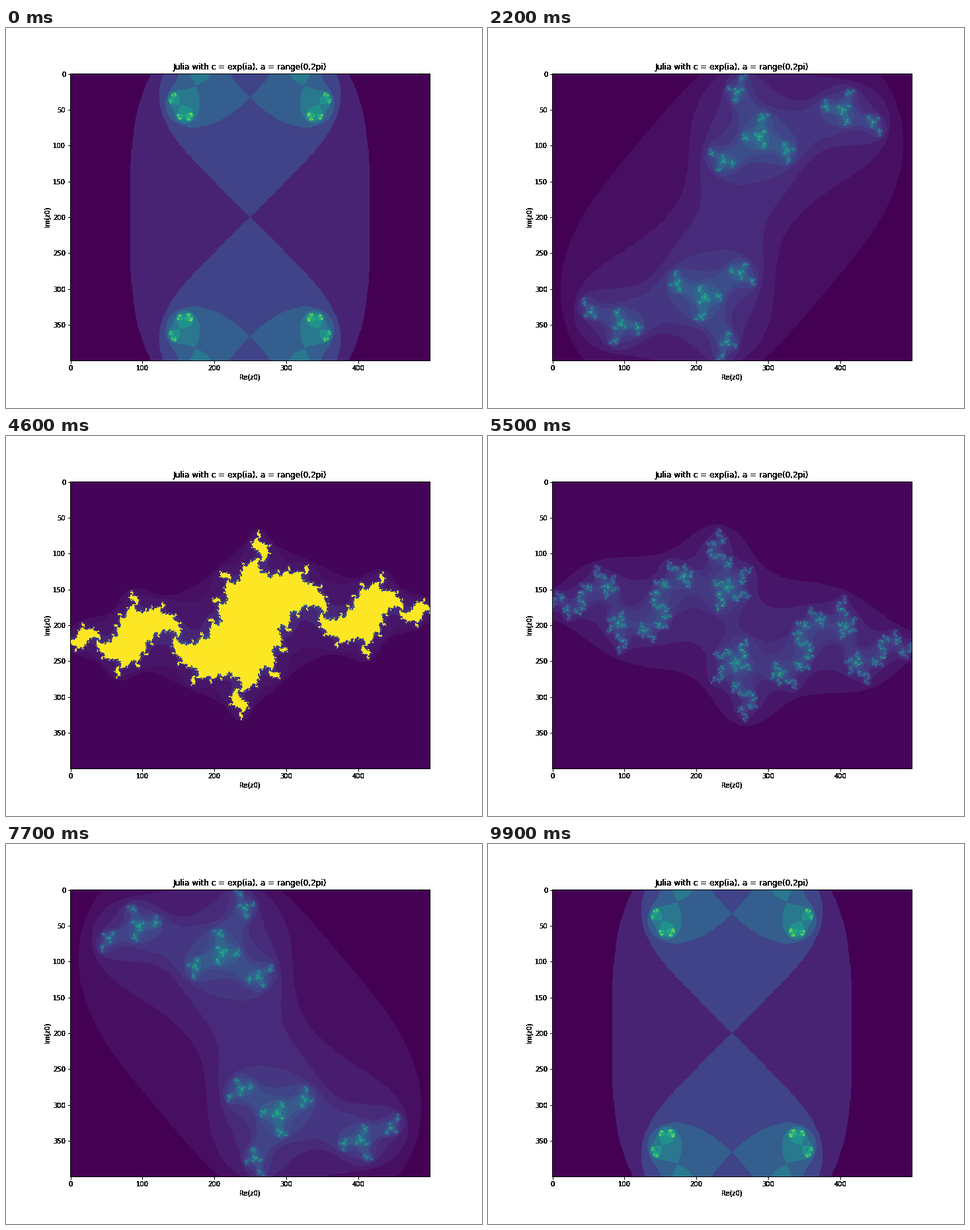
Animation of 720x576 px, one loop 10 s. Source, as a matplotlib script:

```python
import numpy as np
import matplotlib.pyplot as plt
from matplotlib.animation import FuncAnimation

W, H = 500, 400
FRAMES = 100
MAX_ITER = 100

plt.rcParams.update({
    "font.family": "DejaVu Sans",
    "font.size": 10,
    "figure.subplot.bottom": 0.125,
    "axes.linewidth": 1.0,
})

angles = np.linspace(0, 2 * np.pi, FRAMES)
xs = np.linspace(-1.5, 1.5, W)
ys = np.linspace(-1.2, 1.2, H)
half_plane = (xs[None, :] + 1j * ys[:H // 2, None]).ravel()
viridis = plt.get_cmap("viridis")
cache = {}


def escape_times(c):
    """Iterations before |z| > 2; the lower half follows from z -> -z."""
    times = np.full(half_plane.size, MAX_ITER)
    z = half_plane.copy()
    alive = np.arange(z.size)
    for i in range(MAX_ITER):
        z = z * z + c
        out = z.real ** 2 + z.imag ** 2 > 4
        if out.any():
            times[alive[out]] = i
            z, alive = z[~out], alive[~out]
        if not alive.size:
            break
    top = times.reshape(H // 2, W)
    return np.vstack([top, top[::-1, ::-1]])


def times_for(k):
    """Conjugate values of c give vertically mirrored pictures."""
    base = min(k, FRAMES - 1 - k)
    if base not in cache:
        cache[base] = escape_times(np.exp(1j * angles[base]))
    return cache[base] if k == base else cache[base][::-1]


def colorize(times):
    """Viridis over the frame's own range, near-equal shades merged."""
    lo, hi = times.min(), times.max()
    weight = np.bincount(times.ravel(), minlength=MAX_ITER + 1)
    level = np.arange(MAX_ITER + 1)
    shades = viridis((level - lo) / (hi - lo), bytes=True)[:, :3].astype(int)
    r, g, b = shades.T
    bucket = (r >> 5) * 128 + (g >> 4) * 8 + (b >> 5)
    table = shades.astype(float)
    for key in np.unique(bucket):
        same = bucket == key
        if weight[same].sum():
            table[same] = np.average(shades[same], axis=0, weights=weight[same])
    return table.round().astype(np.uint8)[times]


def hard_ink(rgba, dpi):
    """Turn soft text edges into solid black."""
    ink = np.zeros_like(rgba)
    ink[..., 3] = rgba[..., 3] >= 0.125
    return ink, 0, 0


fig, ax = plt.subplots(figsize=(10, 8), dpi=72, facecolor="white")
image = ax.imshow(colorize(times_for(0)), interpolation="nearest")
ax.set_title("Julia with c = exp(ia), a = range(0,2pi)")
ax.set_xlabel("Re(z0)")
ax.set_ylabel("Im(z0)")
ax.set_xticks(range(0, W, 100))
ax.set_yticks(range(0, H, 50))
for part in (ax.title, ax.xaxis, ax.yaxis):
    part.set_agg_filter(hard_ink)


def update(k):
    image.set_data(colorize(times_for(k)))
    return [image]


anim = FuncAnimation(fig, update, frames=FRAMES, interval=100,
                     repeat=True, repeat_delay=0, blit=False)
plt.show()
```
